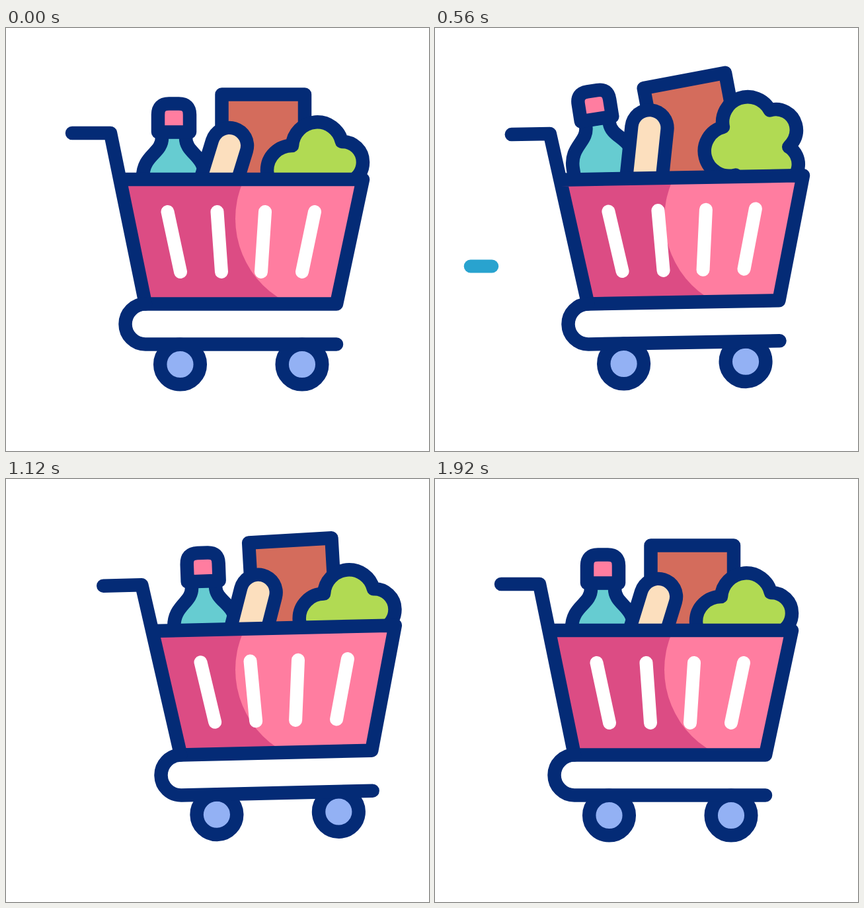
Recreate the animation shown at these times as an HTML page. Size 640 by 640 pixels, loop 2.24 s.

```html
<!DOCTYPE html>
<html lang="en">
<head>
<meta charset="utf-8">
<title>Shopping cart</title>
<style>
  html, body { margin: 0; width: 100%; height: 100%; overflow: hidden; background: #fff; }
  svg { display: block; width: 100%; height: 100%; }
  .line { stroke: #042b76; stroke-width: 20.5; stroke-linecap: round; stroke-linejoin: round; }
  .capsule { stroke-linecap: round; }
</style>
</head>
<body>
<svg viewBox="0 0 640 640" fill="none">
  <defs>
    <clipPath id="basketClip"><path d="M172 229H540L500 418H211Z"/></clipPath>
  </defs>

  <g class="capsule" stroke="#29a3cf" stroke-width="20">
    <path id="dashTop" d="M10 360.5h32.5"/>
    <path id="dashLow" d="M10 401h32.5"/>
  </g>

  <g id="cart">
    <g id="box">
      <path class="line" fill="#d46c5c" d="M326.5 100.5H452V270H326.5Z"/>
    </g>
    <g id="bottle" class="line">
      <path fill="#66ccd1" d="M236 157V166C236 190 207 192 207 226V290H301V226C301 192 272 190 272 166V157Z"/>
      <path fill="#ff7da0" d="M230 157.5V131Q230 114.500 246.500 114.500H261.500Q278 114.500 278 131V157.500Z"/>
    </g>
    <g id="bread" class="capsule">
      <path stroke="#042b76" stroke-width="74.5" d="M338 178L307 279"/>
      <path stroke="#fcdfbe" stroke-width="34" d="M338 178L307 279"/>
    </g>
    <g id="greens">
      <path class="line" fill="#b1da53" d="M432 253A37.5 37.5 0 0 1 433 178A38 38 0 0 1 508 172A31 31 0 0 1 540 203Q540 222 521 233A31 31 0 0 1 497 285H455Z"/>
    </g>

    <g clip-path="url(#basketClip)">
      <path fill="#dc4c84" d="M172 229H540L500 418H211Z"/>
      <g id="shine"><circle cx="489" cy="288.5" r="142" fill="#ff7da0"/></g>
    </g>
    <path class="capsule" stroke="#fff" stroke-width="20"
      d="M244.500 278L264 369M319.500 278L326 369M392 278L386 369M467 278L448 369"/>
    <g class="line">
      <circle cx="263.5" cy="509" r="30.3" fill="#93b1f4"/>
      <circle cx="448" cy="509" r="30.3" fill="#93b1f4"/>
      <path d="M100 159H158L211 417.500H500L540 229H173"/>
      <path d="M211 417.500A30.500 30.500 0 0 0 211 478.500H500"/>
    </g>
  </g>
</svg>

<script>
const LOOP = 2240;
const PIVOT = [211, 448];
const el = id => document.getElementById(id);

// Smooth curve through [time, value] points that never overshoots them.
function curve(points) {
  const n = points.length;
  const slope = i => (points[i + 1][1] - points[i][1]) / (points[i + 1][0] - points[i][0]);
  const tangents = points.map((_, i) => {
    if (i === 0 || i === n - 1) return 0;
    const a = slope(i - 1), b = slope(i);
    return a * b > 0 ? 2 * a * b / (a + b) : 0;
  });
  return t => {
    if (t <= points[0][0]) return points[0][1];
    if (t >= points[n - 1][0]) return points[n - 1][1];
    const i = points.findIndex(p => p[0] > t) - 1;
    const [t0, v0] = points[i], [t1, v1] = points[i + 1];
    const h = t1 - t0, u = (t - t0) / h, w = 1 - u;
    return v0 * w * w * (1 + 2 * u) + v1 * u * u * (3 - 2 * u)
      + h * u * w * (tangents[i] * w - tangents[i + 1] * u);
  };
}

// Back up, dash forward, wait, roll home.
const cartX = curve([[0, 0], [400, -28.6], [560, 20.8], [800, 55.7],
  [1120, 54], [1400, 54], [1680, 13.7], [1920, 0]]);

// The front lifts and drops three times, less and less.
function hop(t, start, end, height) {
  return t > start && t < end ? height * Math.sin(Math.PI * (t - start) / (end - start)) ** 2 : 0;
}
const cartTilt = t => -hop(t, 100, 640, 5.25) - hop(t, 600, 960, 4.2) - hop(t, 960, 1400, 1.6);

// Goods are thrown back one after another, then all rebound and settle together.
function swing(start, rebound) {
  return curve([[start, 0], [start + 380, -1], [800, rebound], [1120, -rebound / 4], [1400, 0]]);
}

const goods = [
  { node: el("box"), anchor: [389, 100.5], x: 38, y: 26.5, turn: 14, sway: swing(85, 0.55) },
  { node: el("bottle"), anchor: [254, 136], x: 28, y: 19.5, turn: 8, sway: swing(200, 0.4) },
  { node: el("bread"), anchor: [338, 178], x: 32, y: 27.5, turn: 11, sway: swing(140, 0.5) },
  { node: el("greens"), anchor: [471, 180.5], x: 15, y: 38, turn: 16, sway: swing(260, -0.1) }
];

const dashes = [
  { node: el("dashTop"), start: 555 },
  { node: el("dashLow"), start: 665 }
];

function place(node, x, y, turn, [cx, cy]) {
  node.setAttribute("transform", `translate(${x} ${y}) rotate(${turn} ${cx} ${cy})`);
}

function draw(t) {
  const shift = cartX(t), tilt = cartTilt(t);
  place(el("cart"), shift, 0, tilt, PIVOT);
  // The light on the basket stays fixed while the cart moves under it.
  el("shine").setAttribute("transform", `rotate(${-tilt} ${PIVOT}) translate(${-shift} 0)`);

  for (const { node, anchor, x, y, turn, sway } of goods) {
    const s = sway(t);
    place(node, x * s, y * s, turn * s, anchor);
  }
  for (const { node, start } of dashes) {
    const age = t - start;
    node.setAttribute("visibility", age >= 0 && age < 340 ? "visible" : "hidden");
    node.setAttribute("transform", `translate(${42 + age * 0.285} 0)`);
  }
}

const begin = performance.now();
function tick() {
  draw((performance.now() - begin) % LOOP);
  requestAnimationFrame(tick);
}
tick();
</script>
</body>
</html>
```
